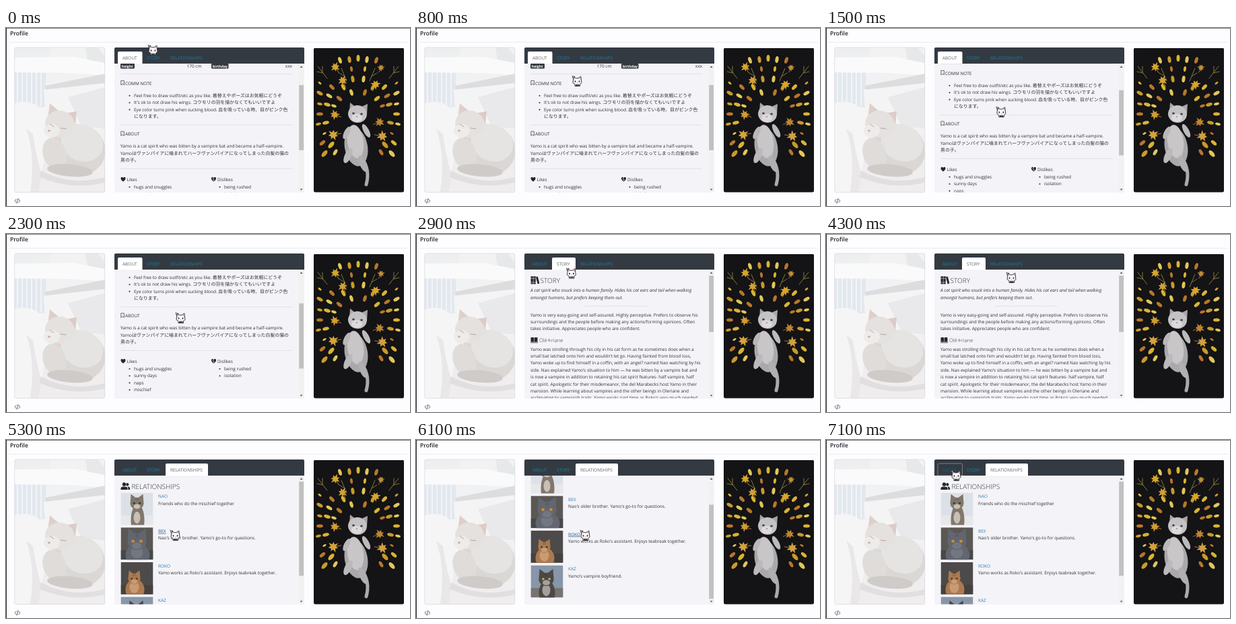
Write an HTML page that moves like this. It is 600x265 px and loops after 7200 ms.

```html
<!DOCTYPE html>
<html lang="en">
<head>
<meta charset="utf-8">
<title>Profile</title>
<style>
html, body { margin: 0; width: 100%; height: 100%; overflow: hidden; background: #fdfcfe; }
svg { display: block; width: 100vw; height: 100vh; }
svg svg { width: 48px; height: 48px; }
text { font: 6.5px "Open Sans", "Noto Sans", sans-serif; fill: #2f3337; text-rendering: geometricPrecision; white-space: pre; }
.ja { font: 6.9px "Noto Sans CJK JP", "Noto Sans CJK", sans-serif; }
.it { font-style: italic; }
.h1 { font-size: 8.6px; font-weight: 600; fill: #212529; }
.big { font-size: 10.1px; font-weight: 300; }
.mid { font-size: 7.6px; font-weight: 300; }
.badge { font-size: 5.2px; font-weight: 700; fill: #fff; }
.link { fill: #2f80bd; }
.end { text-anchor: end; }
</style>
</head>
<body>
<svg id="stage" viewBox="0 0 600 265" preserveAspectRatio="none"></svg>
<script>
const LOOP = 7200, STEP = 100;
const stage = document.getElementById('stage');

// ---- markup helpers
const rect = (x, y, w, h, fill, more = '') => `<rect x="${x}" y="${y}" width="${w}" height="${h}" fill="${fill}" ${more}/>`;
const oval = (x, y, rx, ry, fill, turn = 0) =>
  `<ellipse rx="${rx}" ry="${ry}" fill="${fill}" transform="translate(${x} ${y}) rotate(${turn})"/>`;
const path = (d, fill, more = '') => `<path d="${d}" fill="${fill}" ${more}/>`;
const line = (d, stroke, w) => path(d, 'none', `stroke="${stroke}" stroke-width="${w}" stroke-linecap="round"`);
const text = (x, y, str, cls = '') => `<text x="${x}" y="${y}" class="${cls}">${str}</text>`;
const lines = (x, y, rows, cls) => rows.map((row, i) => text(x, y + i * 10.4, row, cls)).join('');
const bullets = (x, y, rows) => rows.map((row, i) =>
  oval(x - 6.5, y + i * 10.4 - 2.2, 1.05, 1.05, '#2f3337') + text(x, y + i * 10.4, row)).join('');
const rule = (y, x1 = 170, x2 = 425) => rect(x1, y, x2 - x1, 0.6, '#d8d8dd');
const ja = str => `<tspan class="ja" lang="ja">${str}</tspan>`;
const clip = (id, x, y, w, h, r) =>
  `<clipPath id="${id}"><rect x="${x}" y="${y}" width="${w}" height="${h}" rx="${r}"/></clipPath>`;

// ---- pictures
function bedroom() {
  return `<g clip-path="url(#left)">` +
    rect(13, 29, 134, 216, 'url(#wall)') +
    rect(13, 64, 46, 54, '#e3e8ef') +
    [17, 24, 31, 38, 45, 52].map(x => line(`M${x} 64V116`, '#f1f4f8', 2)).join('') +
    path('M66 29H147V74L62 52Z', '#f2f2f3') +
    path('M118 29H136L147 42V66H124Z', '#e6e8ea') +
    path('M13 44L100 43 147 52V70L92 67 13 66Z', '#fafafa') +
    path('M58 86L147 68V84L104 97 62 108Z', '#dcdddf') +
    path('M56 92L147 82V150H60Z', '#f5f4f5') +
    path('M92 103L147 88V150L112 146Z', '#e9e8ea') +
    path('M13 112Q42 104 58 128L66 192 92 244H13Z', '#f6f5f6') +
    path('M30 150Q44 190 36 244H62Q46 204 40 158Z', '#e9e7e8') +
    path('M60 176Q100 230 147 206V245H48Z', '#efedee') +
    path('M52 212Q96 236 147 222V230Q96 242 50 222Z', '#e2dfe0') +
    oval(107, 181, 41, 38, '#dad7d5', 18) +
    oval(113, 171, 32, 27, '#e6e4e2', 24) +
    oval(72, 187, 17, 24, '#dfdcda', -18) +
    oval(95, 212, 34, 9, '#cfcbc9', 5) +
    path('M62 135L65 112 79 124Z', '#dfcfca') +
    path('M88 127L105 124 103 143Z', '#dccbc6') +
    oval(80, 143, 22, 20, '#e4e1df', 14) +
    oval(68, 153, 12, 10, '#eeecea') +
    line('M65 143l6 4M81 149l8 1', '#aaa19d', 0.9) +
    oval(64, 153, 2, 1.4, '#d2aaa6') +
    `</g>` + rect(12.7, 29, 134, 215.6, 'none', 'rx="2.5" stroke="#d2d2d6" stroke-width=".6"');
}

const maple = (x, y, s, fill, turn) => {
  let d = '';
  for (let i = 0; i < 14; i++) {
    const a = i * Math.PI / 7, r = i % 2 ? s * 0.45 : s * (1 - 0.18 * (i % 4 === 0));
    d += (i ? 'L' : 'M') + (r * Math.sin(a)).toFixed(1) + ' ' + (-r * Math.cos(a)).toFixed(1);
  }
  return `<g transform="translate(${x} ${y}) rotate(${turn})">${path(d + 'Z', fill)}${line(`M0 0V${s * 1.3}`, fill, 0.7)}</g>`;
};

function leafBed() {
  const tones = ['#d9b431', '#c99a2c', '#e0c75a', '#b7772c'];
  // half of the leaves: distance from the axis, height, length
  const half = [[0, 45, 5], [13, 47, 5], [27, 48, 5], [10, 61, 4], [22, 88, 5], [8, 76, 5], [10, 96, 5], [39, 88, 5],
    [57, 82, 3], [57, 97, 5], [43, 101, 5], [28, 105, 5], [46, 114, 5], [57, 113, 4], [36, 116, 4], [57, 128, 5],
    [48, 141, 5], [59, 143, 4], [50, 157, 3], [53, 171, 5], [40, 174, 6], [50, 187, 6], [34, 185, 5]];
  let out = `<g clip-path="url(#right)">` + rect(457, 30, 134, 215, '#141315');
  half.forEach(([dx, y, s], i) => (dx ? [-1, 1] : [1]).forEach((side, k) => {
    const turn = Math.atan2(y - 128, dx * side) * 180 / Math.PI;
    out += oval(523 + dx * side, y, s, s * 0.5, tones[(i + k) % 4], turn);
  }));
  [-1, 1].forEach(side => {
    const x = dx => 523 + side * dx;
    out += line(`M${x(46)} 75L${x(60)} 57M${x(52)} 67L${x(61)} 65M${x(53)} 66L${x(53)} 57M${x(17)} 79L${x(25)} 60M${x(20)} 72L${x(28)} 67`, '#7e7a3c', 1);
  });
  [[489, 58, 8, '#d6a62c', -30], [500, 78, 8, '#d2a03a', -25], [549, 84, 8, '#d8a52a', 25], [557, 59, 6, '#c28d35', 25],
    [488, 129, 8, '#d39c33', -70], [486, 159, 9, '#d4a43c', -100], [555, 140, 8, '#bf852d', 70], [559, 161, 9, '#d0a040', 100]]
    .forEach(m => { out += maple(...m); });
  out += line('M529 194Q541 212 535 233', '#aaa9ab', 5) +
    oval(520, 177, 17, 29, '#a9a8ab', -10) +
    oval(519, 169, 12, 25, '#c8c6c7', -8) +
    oval(506, 156, 4, 10, '#b9b7b8', 26) + oval(535, 153, 4, 11, '#bcbabc', -28) +
    oval(508, 190, 5, 12, '#bbb9bb', 25) + oval(530, 202, 5, 13, '#b1afb2', -22) +
    path('M510 126L511 111 521 119Z', '#aba5a6') + path('M526 118L537 113 536 129Z', '#aba5a6') +
    oval(522, 128, 14, 13, '#c4c2c4', 8) + oval(521, 134, 8, 6, '#dcdadb') +
    oval(516, 127, 1.9, 1.6, '#39434a') + oval(528, 128, 1.9, 1.6, '#39434a') + oval(521, 132, 1.3, 0.9, '#b98c8c');
  return out + '</g>';
}

function portrait(y, p) {
  const { bg, floor, fur, chest, eye, x, hy, r, bw } = p;
  return `<svg x="170.5" y="${y}" width="48" height="48" viewBox="0 0 48 48">` +
    rect(0, 0, 48, 48, bg) + rect(0, 34, 48, 14, floor) +
    oval(x + 1, 41, bw, 46 - hy - r * 0.6, fur) + oval(x, 37, bw * 0.5, 9, chest) +
    path(`M${x - r} ${hy}l1 ${-r * 1.4} ${r * 0.8} ${r * 0.6}ZM${x + r} ${hy}l-1 ${-r * 1.4} ${-r * 0.8} ${r * 0.6}Z`, fur) +
    oval(x, hy, r, r * 0.9, fur) + oval(x, hy + r * 0.45, r * 0.5, r * 0.36, chest) +
    [-1, 1].map(k => oval(x + k * r * 0.42, hy - 0.5, r * 0.17, r * 0.15, eye)).join('') +
    line(`M${x} ${hy - r * 0.8}v${r * 0.35}M${x - 2} ${hy - r * 0.7}v2M${x + 2} ${hy - r * 0.7}v2`, '#3c373466', 0.8) + '</svg>';
}

const friends = [
  ['NAO', 'Friends who do the mischief together',
    { bg: '#dce1e8', floor: '#e7e8ea', fur: '#81776c', chest: '#c8bfb5', eye: '#30383d', x: 24, hy: 16, r: 10, bw: 10 }],
  ['BEX', "Nao's older brother. Yamo's go-to for questions.",
    { bg: '#5a5754', floor: '#45474b', fur: '#62666f', chest: '#737781', eye: '#d98a2d', x: 24, hy: 21, r: 14, bw: 18 }],
  ['ROKO', "Yamo works as Roko's assistant. Enjoys teabreak together.",
    { bg: '#4d4a4a', floor: '#45413f', fur: '#ad794f', chest: '#c99b74', eye: '#4b3a25', x: 20, hy: 25, r: 9, bw: 14 }],
  ['KAZ', "Yamo's vampire boyfriend.",
    { bg: '#8796a8', floor: '#77736f', fur: '#4b4845', chest: '#a5a09b', eye: '#c3b15b', x: 23, hy: 21, r: 11, bw: 12 }]
];
const rowY = i => 78.5 + 51.65 * i;

// ---- icons
const heart = x => path(`M${x} 268.2c-2 -1.7 -3.5 -3 -3.5 -4.8c0 -2.2 2.6 -2.6 3.5 -.8c.9 -1.8 3.5 -1.4 3.5 .8c0 1.8 -1.5 3.1 -3.5 4.8Z`, '#24282c', 'transform="translate(0 5.6)"');
const bookmark = y => path(`M170.8 ${y - 5.6}h4.6v6.4l-2.3 -1.7 -2.3 1.7Z`, 'none', 'stroke="#2f3337" stroke-width=".7"');
const shelf = rect(170.5, 63, 3.4, 11.5, '#24282c') + rect(174.4, 63, 3.4, 11.5, '#24282c') +
  path('M178 64l2.8 -.8 2.6 10.4 -2.8 .8Z', '#24282c') +
  line('M170.8 66h2.8M174.7 66h2.8M170.8 72h2.8M174.7 72h2.8', '#f4f3f7', 0.6);
const openBook = path('M170.5 154.2q2.5 -1 4.7 0v6.8q-2.2 -.8 -4.7 0ZM175.8 154.2q2.3 -1 4.7 0v6.8q-2.4 -.8 -4.7 0Z', '#24282c') +
  line('M170.5 161.8h10', '#24282c', 0.7);
const people = oval(175.5, 66, 2.7, 2.8, '#24282c') + path('M170.5 74v-1.4q0 -3 3 -3h4q3 0 3 3v1.4Z', '#24282c') +
  oval(180.3, 66.2, 2, 2.2, '#24282c') + path('M181.4 74v-1.4q0 -1.8 -1 -3h1q2.7 0 2.7 2.7v1.7Z', '#24282c');

// ---- panes, laid out at scroll zero
const badge = (x, w, str) => rect(x, 97.8, w, 7.8, '#343a40', 'rx="1.6"') + text(x + 1.8, 103.6, str, 'badge');
const aboutPane =
  badge(170, 21, 'height') + text(290.5, 104.3, '170 cm', 'end') +
  badge(305, 25.5, 'birthday') + text(425, 104.3, 'xxx', 'end') + rule(113.3) +
  bookmark(129) + text(177, 129.6, 'COMM NOTE') +
  bullets(190, 148, [
    'Feel free to draw outfit/etc as you like. ' + ja('着替えやポーズはお気軽にどうぞ'),
    "It's ok to not draw his wings. " + ja('コウモリの羽を描かなくてもいいですよ'),
    'Eye color turns pink when sucking blood. ' + ja('血を吸っている時、目がピンク色')]) +
  text(190, 179.2, ja('になります。')) + rule(189.3) +
  bookmark(204.6) + text(177, 205.1, 'ABOUT') +
  lines(170, 223.2, ['Yamo is a cat spirit who was bitten by a vampire bat and became a half-vampire.',
    'Yamo' + ja('はヴァンパイアに噛まれてハーフヴァンパイアになってしまった白髪の猫の'), ja('男の子。')]) + rule(254) +
  heart(174) + text(179.5, 273.4, 'Likes') + bullets(190, 284, ['hugs and snuggles', 'sunny days', 'naps', 'mischief']) +
  heart(308.5) + line('M308.2 267.6l-1 2.2 1.9 1 -.9 2.2', '#f4f3f7', 0.7) +
  text(314, 273.4, 'Dislikes') + bullets(324, 284, ['being rushed', 'isolation']);

const storyPane = shelf + text(184.5, 72.6, 'STORY', 'big') +
  lines(170, 86.2, ['A cat spirit who snuck into a human family. Hides his cat ears and tail when walking',
    'amongst humans, but prefers keeping them out.'], 'it') + rule(107, 250, 344) +
  lines(170, 122.6, ['Yamo is very easy-going and self-assured. Highly perceptive. Prefers to observe his',
    'surroundings and the people before making any actions/forming opinions. Often',
    'takes initiative. Appreciates people who are confident.']) +
  openBook + text(183, 160.8, 'Olé✧riane', 'mid') +
  lines(170, 173.6, ['Yamo was strolling through his city in his cat form as he sometimes does when a',
    "small bat latched onto him and wouldn't let go. Having fainted from blood loss,",
    'Yamo woke up to find himself in a coffin, with an angel? named Nao watching by his',
    "side. Nao explained Yamo's situation to him — he was bitten by a vampire bat and",
    'is now a vampire in addition to retaining his cat spirit features- half vampire, half',
    'cat spirit. Apologetic for their misdemeanor, the del Marabecks host Yamo in their',
    'mansion. While learning about vampires and the other beings in Oleriane and',
    "acclimating to vampirish traits, Yamo works part time as Roko's very much needed"]);

const friendsPane = people + text(186.5, 72.6, 'RELATIONSHIPS', 'big') +
  friends.map(([name, note, look], i) => portrait(rowY(i), look) +
    `<g class="name">${text(226, rowY(i) + 7.8, name, 'link')}</g>` + text(226, rowY(i) + 18.2, note)).join('');

// name, left, width, thumb length, thumb travel per scrolled pixel
const tabs = [['ABOUT', 166, 36.5, 97, 0.51], ['STORY', 202, 35, 84, 0.44], ['RELATIONSHIPS', 237, 63, 140, 0.73]];
const panes = [aboutPane, storyPane, friendsPane];

const pointer = `<g id="pointer">` +
  path('M-7.5 -8l5 1.2 -3.4 3.6Z', '#2b2a2e') + oval(-5.4, -6.2, 1, 1, '#fff') +
  path('M-5.5 -1L-5 -6.5 -1.5 -4.2H2L5.8 -7 6.5 -1 7 2.5 4.5 4.6V7.5H-3V4.6L-6 2.5Z', '#fff', 'stroke="#37343a" stroke-width="1" stroke-linejoin="round"') +
  path('M-4.6 -5.2l2 1.5 -1.8 1.6ZM5.2 -5.6l.4 3.4 -2.4 -1.8Z', '#c98f99') +
  rect(-3.4, -0.6, 1.8, 2.3, '#3b3038') + rect(2.6, -0.6, 1.8, 2.3, '#3b3038') +
  rect(-0.2, 2, 1.3, 0.8, '#c4707c') + rect(-2, 4.8, 5.5, 2.3, '#4a464c') + rect(0, 4.8, 1.4, 1.3, '#b8404d') + '</g>';

stage.innerHTML = `<defs><linearGradient id="wall" x2="0" y2="1"><stop stop-color="#eceef0"/><stop offset=".4" stop-color="#f5f5f6"/>
  <stop offset="1" stop-color="#ebe8e9"/></linearGradient>` +
  clip('left', 12.7, 29, 134, 215.6, 2.5) + clip('right', 457, 29.5, 134, 215, 2.5) + clip('body', 161, 53, 274, 191.5, 0) + '</defs>' +
  rect(0, 0, 600, 265, '#fdfcfe') + rect(0, 0, 1, 265, '#222') + rect(0, 0, 600, 0.6, '#333') +
  text(6, 11.4, 'Profile', 'h1') + rect(5, 20.8, 592, 0.6, '#dcdce0') + bedroom() + leafBed() +
  rect(161, 29, 282, 216, '#f4f3f7', 'rx="2"') + path('M161 53V31q0 -2 2 -2H441q2 0 2 2V53Z', '#343a42') +
  tabs.map(([name, x, w]) => `<g class="tab">${path(`M${x} 53V37q0 -2 2 -2h${w - 4}q2 0 2 2V53Z`, 'none')}${text(x + 7, 46.6, name)}</g>`).join('') +
  `<g clip-path="url(#body)">${panes.map(p => `<g class="pane">${p}</g>`).join('')}</g>` +
  rect(434.5, 53, 8.2, 191.5, '#f1f1f1') + rect(435.2, 62, 6.8, 90, '#c1c1c1', 'id="thumb"') +
  path('M436.6 59l2 -2.4 2 2.4Z', '#55585c') + path('M436.6 239.4l2 2.4 2 -2.4Z', '#55585c') +
  line('M15.2 255l-2 2.4 2 2.4M18.8 255l2 2.4 -2 2.4M17.8 254l-1.6 7', '#3a3d41', 0.8) + pointer;

// ---- motion
const moves = [[0, 218, 33], [400, 218, 33], [1200, 260, 125], [2300, 259, 125], [2700, 226, 50], [2800, 226, 50], [3300, 268, 131],
  [3700, 268, 131], [4300, 275, 65], [4500, 271, 50], [4700, 271, 50], [5300, 251, 142], [6400, 251, 142], [6900, 193, 53], [7200, 193, 53]];
const scrolls = [
  [[0, 45], [1200, 45], [1500, 60], [1900, 81], [7200, 81]],
  [[0, 0], [3300, 0], [3500, 1], [3700, 0], [7200, 0]],
  [[0, 0], [5400, 0], [5800, 47], [6150, 47], [6500, 0], [7200, 0]]
];
function at(keys, t, col = 1) {
  const i = Math.max(1, keys.findIndex(k => k[0] >= t));
  const a = keys[i - 1], b = keys[i], u = (t - a[0]) / (b[0] - a[0]);
  return a[col] + (b[col] - a[col]) * u * u * (3 - 2 * u);
}

const $$ = sel => [...stage.querySelectorAll(sel)];
const tabEls = $$('.tab'), paneEls = $$('.pane'), nameEls = $$('.name text');
const thumb = stage.querySelector('#thumb'), cursor = stage.querySelector('#pointer');

function draw(t) {
  const open = t < 2800 ? 0 : t < 4600 ? 1 : 2;
  const x = at(moves, t), y = at(moves, t, 2), hx = x - 7, hy = y - 7;
  const scroll = at(scrolls[open], t);
  cursor.setAttribute('transform', `translate(${x} ${y})`);
  tabEls.forEach((el, i) => {
    const [, left, w] = tabs[i], [box, label] = el.children;
    const over = i !== open && hx > left && hx < left + w && hy > 35 && hy < 53;
    box.setAttribute('fill', i === open ? '#fff' : 'none');
    box.setAttribute('stroke', over ? '#a9adb2' : 'none');
    box.setAttribute('stroke-width', 0.6);
    label.style.fill = i === open ? '#5c6268' : over ? '#12607c' : '#18809f';
  });
  paneEls.forEach((el, i) => el.setAttribute('display', i === open ? 'inline' : 'none'));
  paneEls[open].setAttribute('transform', `translate(0 ${-scroll})`);
  nameEls.forEach((el, i) => {
    const top = rowY(i) - scroll;
    const over = open === 2 && hx > 225 && hx < 246 && hy > top - 1 && hy < top + 10;
    el.style.textDecoration = over ? 'underline' : 'none';
    el.style.fill = over ? '#1c5a8c' : '';
  });
  thumb.setAttribute('y', 62 + scroll * tabs[open][4]);
  thumb.setAttribute('height', tabs[open][3]);
}

const start = performance.now();
function tick(now) {
  const t = Math.max(0, now - start) % LOOP;
  draw(Math.floor(t / STEP) * STEP);
  requestAnimationFrame(tick);
}
draw(0);
requestAnimationFrame(tick);
</script>
</body>
</html>
```
